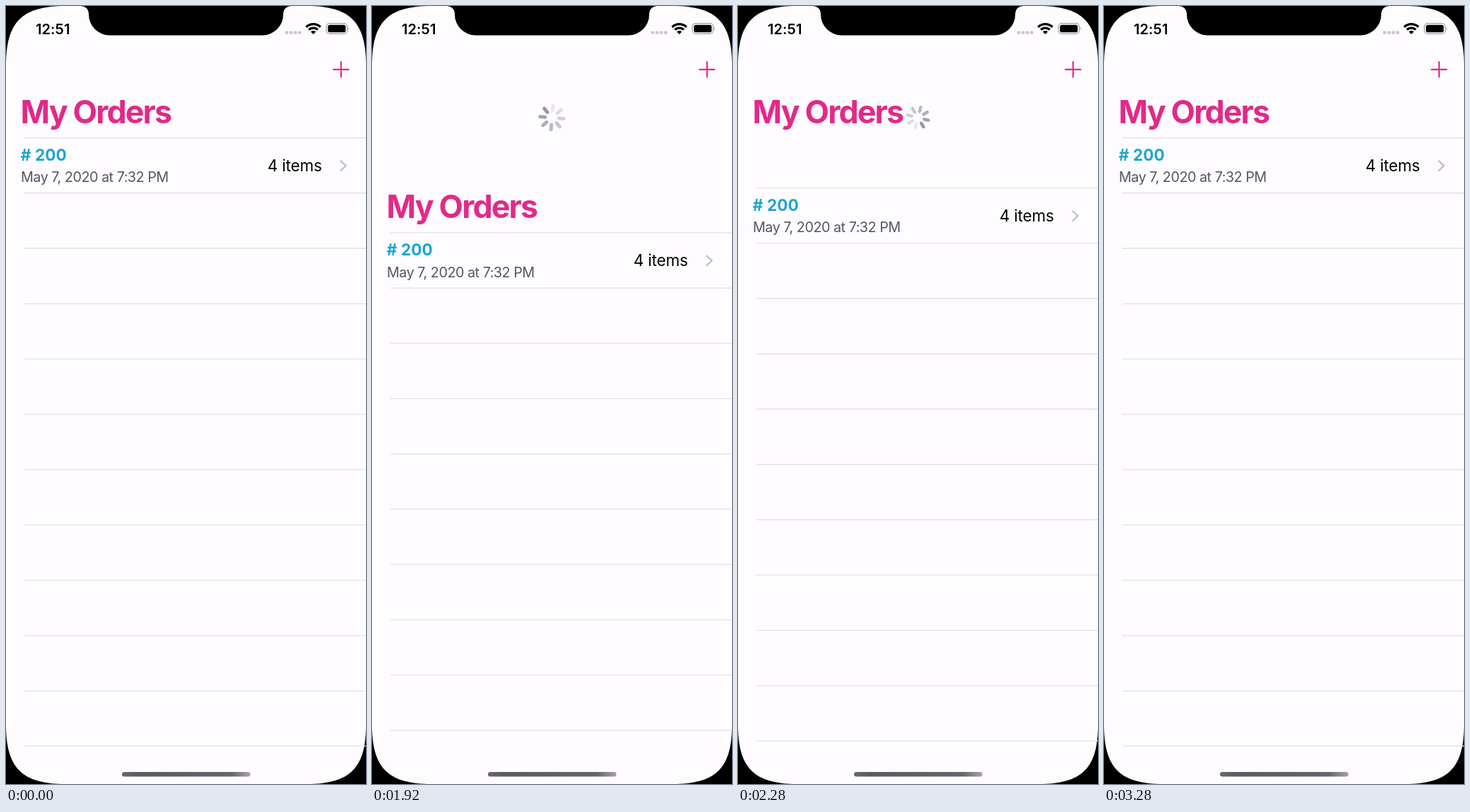
Write an HTML page that moves like this. It is 509 px wide and 1101 px high and loops after 3360 ms.

```html
<!DOCTYPE html>
<html lang="en">
<head>
<meta charset="utf-8">
<title>My Orders</title>
<style>
  html, body { margin: 0; width: 100%; height: 100%; overflow: hidden; background: #000; }
  svg { display: block; width: 100vw; height: 100vh; }
  text { font-family: Inter, "Liberation Sans", sans-serif; font-optical-sizing: none; }
  .pink { fill: #e12a88; }
  .stroke { fill: none; stroke-linecap: round; stroke-linejoin: round; }
</style>
</head>
<body>
<svg viewBox="0 0 509 1101">
  <defs>
    <linearGradient id="bar">
      <stop offset="0" stop-color="#6b696e"/>
      <stop offset=".12" stop-color="#5c5a5f"/>
      <stop offset=".85" stop-color="#67656a"/>
      <stop offset="1" stop-color="#a5a3a8"/>
    </linearGradient>
  </defs>

  <path fill="#fefcff" d="M0 84C0 22.5 22.5 0 84 0H425C486.500 0 509 22.5 509 84V1017C509 1078.500 486.500 1101 425 1101H84C22.5 1101 0 1078.500 0 1017Z"/>
  <path d="M106 0Q117 1 117 12A29.5 29.5 0 0 0 146.500 41.5H362.500A29.5 29.5 0 0 0 392 12Q392 1 403 0Z"/>

  <!-- status bar -->
  <text x="42" y="39.7" font-size="20" font-weight="600" letter-spacing=".1">12:51</text>
  <g fill="#c9c7cb">
    <rect x="394.5" y="35.5" width="4.6" height="4.2" rx="1.2"/>
    <rect x="400.7" y="35.5" width="4.6" height="4.2" rx="1.2"/>
    <rect x="406.8" y="35.5" width="4.6" height="4.2" rx="1.2"/>
    <rect x="412.9" y="35.5" width="4.6" height="4.2" rx="1.2"/>
  </g>
  <path d="M434.5 40L431 36.5A5 5 0 0 1 438 36.5Z"/>
  <path fill="none" stroke="#000" stroke-width="3.3" d="M424.4 29.9A14.3 14.3 0 0 1 444.6 29.9M428.2 33.7A8.9 8.9 0 0 1 440.8 33.7"/>
  <rect x="453" y="24.6" width="29.4" height="14.8" rx="4.4" fill="none" stroke="#a3a1a5" stroke-width="1.3"/>
  <rect x="455.2" y="26.7" width="25" height="10.6" rx="2.6"/>
  <path fill="#a3a1a5" d="M483.8 29.6Q486 32 483.8 34.6Z"/>

  <path class="stroke" stroke="#e12a88" stroke-width="2.2" d="M463 89.8H484.4M473.7 79.1V100.5"/>

  <g id="spinner"></g>

  <g id="lines" stroke="#e3e1e5" stroke-width="1.3"></g>
  <text id="title" class="pink" x="20.6" y="166" font-size="44.7" font-weight="700" letter-spacing="-1.85">My Orders</text>
  <g id="row">
    <text x="20.7" y="219" font-size="22.6" font-weight="700" letter-spacing=".1" fill="#1fa5cf">#&#160;200</text>
    <text x="21" y="249.3" font-size="19.8" letter-spacing="-.5" fill="#58565b">May 7, 2020 at 7:32 PM</text>
    <text x="446.8" y="234" font-size="22.4" letter-spacing="-.1" text-anchor="end">4 items</text>
    <path class="stroke" stroke="#c3c1c5" stroke-width="2.4" d="M473.3 219.3L480.6 226L473.3 232.8"/>
  </g>

  <rect x="164" y="1084" width="181.5" height="6.4" rx="3.2" fill="url(#bar)"/>
</svg>
<script>
const LOOP = 3360, STEP = 40, PULL = 1560, DONE = 2240;
const TOP = 186.5, PITCH = 78.26, SAFE = 1055.5;
const $ = id => document.getElementById(id);
const clamp = p => Math.min(1, Math.max(0, p));
const ease = p => (1 - Math.cos(Math.PI * clamp(p))) / 2;
const shift = (el, y) => el.setAttribute("transform", `translate(0 ${y.toFixed(2)})`);

function add(parent, attrs) {
  const el = document.createElementNS("http://www.w3.org/2000/svg", "path");
  for (const key in attrs) el.setAttribute(key, attrs[key]);
  return parent.appendChild(el);
}

const lines = Array.from({ length: 12 }, () => add($("lines"), { d: "M26 0H509" }));
const spokes = Array.from({ length: 8 }, (_, i) => add($("spinner"), {
  d: "M0 -10V-16.8", class: "stroke", stroke: "#3c3c43", "stroke-width": 5,
  transform: `rotate(${-45 * i})`
}));

// Held pull, critically damped release to the refresh height, then collapse.
function pullOffset(t) {
  if (t < PULL) return 0;
  const x = Math.max(0, (t - 1734) * 0.0119);
  return (73 + 174.5 * (1 + x) * Math.exp(-x)) * (1 - ease((t - 2232) / 323));
}

function drawSpinner(t) {
  const size = t < PULL ? 0 : 1 - ease((t - 2224) / 285);
  $("spinner").style.display = size > 0.02 ? "" : "none";
  const u = (t - PULL) / 1000;
  const angle = 112.5 + 600 * u - 68 * u * u;
  $("spinner").setAttribute("transform", `translate(254.5 158) rotate(${angle}) scale(${size})`);
  const p = clamp(u / 0.28), head = 0.62 - 0.1 * p, tail = 0.46 - 0.35 * p;
  spokes.forEach((s, i) => s.setAttribute("stroke-opacity", head + (tail - head) * i / 7));
}

function draw(now) {
  const t = Math.floor(now % LOOP / STEP) * STEP;
  const off = pullOffset(t);
  shift($("title"), t < DONE ? off : 0);
  shift($("row"), off);
  lines.forEach((line, i) => {
    const y = TOP + PITCH * i + off;
    shift(line, y);
    line.style.display = y < SAFE ? "" : "none";
  });
  drawSpinner(t);
  requestAnimationFrame(draw);
}
draw(0);
</script>
</body>
</html>
```
